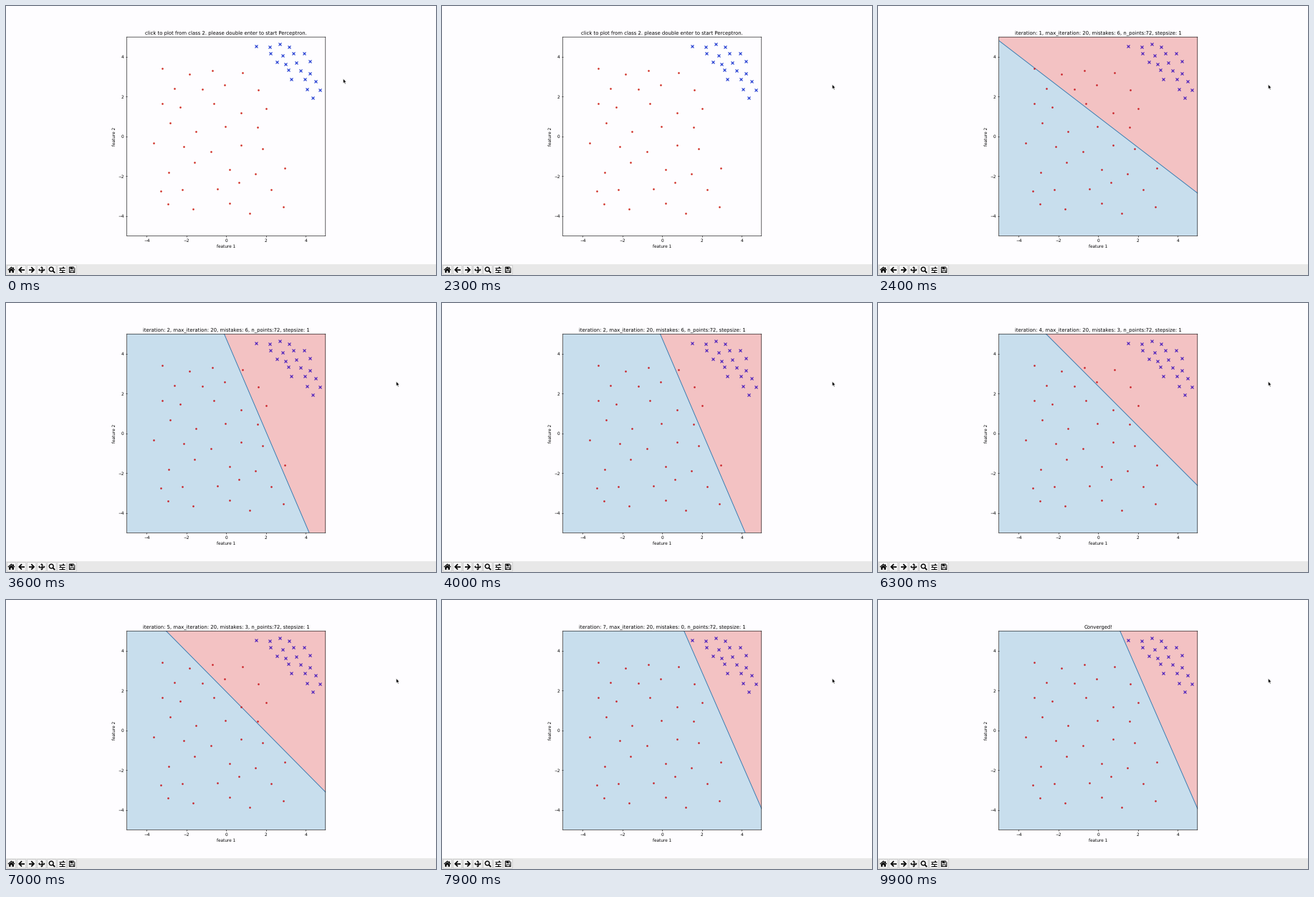
A matplotlib script that plays this animation: 600x375 px, repeating every 10 s.

```python
import numpy as np
import matplotlib.pyplot as plt
from matplotlib.animation import FuncAnimation
from matplotlib.patches import Circle, Polygon, Rectangle

W, H, DPI = 600, 375, 100
TOOLBAR = 15
K = 125 / 300      # the window is shown at this scale
PX = 72 / DPI      # points per pixel
PAPER = "#fefdff"

plt.rcParams.update({
    "font.family": "DejaVu Sans",
    "font.size": 10 * K,
    "axes.titlesize": 11.93 * K,
    "axes.labelsize": 10 * K,
    "axes.titlepad": 6 * K,
    "axes.labelpad": 4 * K,
    "axes.linewidth": 0.6 * PX,
    "text.hinting": "none",
})
for tick in ("xtick", "ytick"):
    plt.rcParams.update({
        f"{tick}.labelsize": 10 * K,
        f"{tick}.major.size": 3.5 * K,
        f"{tick}.major.pad": 3.5 * K,
        f"{tick}.major.width": 0.6 * PX,
    })

SIDE = 0.77 * (H - TOOLBAR)
CENTER = (307.2, 181.8)

# Slope and intercept of the decision line after each pass
LINES = [(-0.767, 0.985), (-2.336, 4.77), (-0.795, 0.875),
         (-1, 2.38), (-1.01, 1.95), (-2.29, 7.52)]
MISTAKES = [6, 6, 4, 3, 3, 3, 0]
PASSES = len(MISTAKES)
PROMPT = "click to plot from class 2. please double enter to start Perceptron."

fig = plt.figure(figsize=(W / DPI, H / DPI), dpi=DPI, facecolor=PAPER)

ax = fig.add_axes([(CENTER[0] - SIDE / 2) / W, 1 - (CENTER[1] + SIDE / 2) / H,
                   SIDE / W, SIDE / H])
ax.set(xlim=(-5, 5), ylim=(-5, 5), xlabel="feature 1", ylabel="feature 2",
       xticks=range(-4, 5, 2), yticks=range(-4, 5, 2))
title = ax.set_title(PROMPT)
for spine in ax.spines.values():
    spine.set_snap(False)

region = ax.add_patch(Polygon([(0, 0), (1, 0), (0, 1)], fc="#c8deed", lw=0, zorder=1))
boundary, = ax.plot([], [], color="#2a75ae", lw=1.5 * K, zorder=1.5)


def clicked_points(seed, rows, pitch, left, right, jitter):
    """Staggered rows between two edges, each point shaken a little."""
    rng = np.random.default_rng(seed)
    points = [(x, y) for i, y in enumerate(rows)
              for x in np.arange(left(y) + i % 2 * pitch / 2, right(y), pitch)]
    return (np.array(points) + rng.uniform(-jitter, jitter, (len(points), 2))).T


class_1 = clicked_points(4, np.linspace(3.4, -3.6, 8), 1.38, lambda y: -3.5,
                         lambda y: min(3.2, (6.2 - y) / 2.29), 0.3)
class_2 = clicked_points(2, np.linspace(4.6, 1.45, 8), 0.56, lambda y: 6.15 - y,
                         lambda y: min(4.65, 8.3 - y), 0.12)
dots, = ax.plot(*class_1, "o", ms=2.6 * PX, mew=0, zorder=2)
crosses, = ax.plot(*class_2, "x", ms=3.7 * PX, mew=1.1 * PX, zorder=2)

# Window layer in pixels, y pointing down
win = fig.add_axes([0, 0, 1, 1], facecolor="none")
win.set(xlim=(0, W), ylim=(H, 0))
win.axis("off")


def shape(points):
    win.add_patch(Polygon(points, fc="black", lw=0))


def box(x, y, w, h, color="black", edge="none"):
    win.add_patch(Rectangle((x, y), w, h, fc=color, ec=edge, snap=False,
                            lw=0 if edge == "none" else 0.7 * PX))


def stroke(xs, ys, width):
    win.plot(xs, ys, color="black", lw=width * PX, solid_capstyle="butt",
             solid_joinstyle="miter")


def draw_toolbar():
    face = "#f3f3f3"
    y = 367.8
    box(0, H - TOOLBAR, W, TOOLBAR, "#e8e8e8")
    home, back, forward, pan, zoom, sliders, save = centers = 7.5 + 14.1 * np.arange(7)
    for x in centers:
        box(x - 6.2, y - 6.2, 12.4, 12.4, face, "#c2c2c2")

    x = home
    stroke([x - 4.6, x, x + 4.6], [y + 0.3, y - 3.7, y + 0.3], 1.2)
    shape([(x - 3.4, y + 0.6), (x, y - 2.3), (x + 3.4, y + 0.6), (x + 3.4, y + 4),
           (x + 1, y + 4), (x + 1, y + 1.4), (x - 1, y + 1.4), (x - 1, y + 4),
           (x - 3.4, y + 4)])
    box(x + 2.2, y - 3.5, 1.2, 2.3)

    for x, d in ((back, 1), (forward, -1)):
        stroke([x + 0.4 * d, x - 3.3 * d, x + 0.4 * d], [y - 3.7, y, y + 3.7], 1.7)
        stroke([x - 3 * d, x + 4.2 * d], [y, y], 1.7)

    x = pan
    stroke([x - 3.5, x + 3.5], [y, y], 1.4)
    stroke([x, x], [y - 3.5, y + 3.5], 1.4)
    for dx, dy in ((1, 0), (-1, 0), (0, 1), (0, -1)):
        shape([(x + 4.7 * dx, y + 4.7 * dy),
               (x + 2.7 * dx + 1.9 * dy, y + 2.7 * dy + 1.9 * dx),
               (x + 2.7 * dx - 1.9 * dy, y + 2.7 * dy - 1.9 * dx)])

    x = zoom
    win.add_patch(Circle((x - 0.7, y - 0.8), 2.9, fc="none", ec="black", lw=1.4 * PX))
    stroke([x + 1.2, x + 4.3], [y + 1.1, y + 4.2], 1.8)

    x = sliders
    for dy, knob in ((-3, 2), (0, -2), (3, 1)):
        stroke([x - 4.3, x + 4.3], [y + dy, y + dy], 1)
        box(x + knob - 0.8, y + dy - 1.2, 1.6, 2.4)

    x = save
    shape([(x - 4.2, y - 4.2), (x + 2.4, y - 4.2), (x + 4.2, y - 2.4),
           (x + 4.2, y + 4.2), (x - 4.2, y + 4.2)])
    box(x - 3.2, y - 3.2, 6.4, 6.4, face)
    box(x - 2.4, y - 4, 4.4, 3.2)
    box(x + 0.2, y - 3.2, 0.9, 1.6, face)
    box(x - 2.5, y + 0.6, 5, 3.4)
    box(x - 1.6, y + 1.5, 3.2, 1.8, face)


draw_toolbar()

ARROW = np.array([(0, 0), (0, 6.1), (1.4, 4.9), (2.4, 7.2), (3.4, 6.8),
                  (2.4, 4.5), (4.2, 4.4)])
cursor = win.add_patch(Polygon(ARROW, fc="black", ec="white", lw=0.4 * PX))


def pass_start(k):
    """Frame at which pass k appears; later passes come faster."""
    return round(24 + 13 * k - 0.65 * k * k)


def update(frame):
    p = min(frame / 11, 1)
    p = p * p * (3 - 2 * p)
    cursor.set_xy(ARROW + (470.6 + 74 * p, 101.5 + 8 * p))

    step = sum(frame >= pass_start(k) for k in range(PASSES + 1))
    running = step > 0
    region.set_visible(running)
    boundary.set_visible(running)
    ax.set_facecolor("#f3c2c3" if running else PAPER)
    dots.set_color("#c81e24" if running else "#cf2a20")
    crosses.set_color("#451abb" if running else "#1a35d0")

    if running:
        slope, intercept = LINES[min(step, len(LINES)) - 1]
        xs = np.array([-6, 6])
        ys = slope * xs + intercept
        boundary.set_data(xs, ys)
        region.set_xy([*zip(xs, ys), (6, -60), (-6, -60)])

    if not running:
        title.set_text(PROMPT)
    elif step > PASSES:
        title.set_text("Converged!")
    else:
        title.set_text(f"iteration: {step}, max_iteration: 20, "
                       f"mistakes: {MISTAKES[step - 1]}, n_points:72, stepsize: 1")
    return cursor, region, boundary, dots, crosses, title


anim = FuncAnimation(fig, update, frames=100, interval=100, repeat=True, repeat_delay=0)
plt.show()
```
